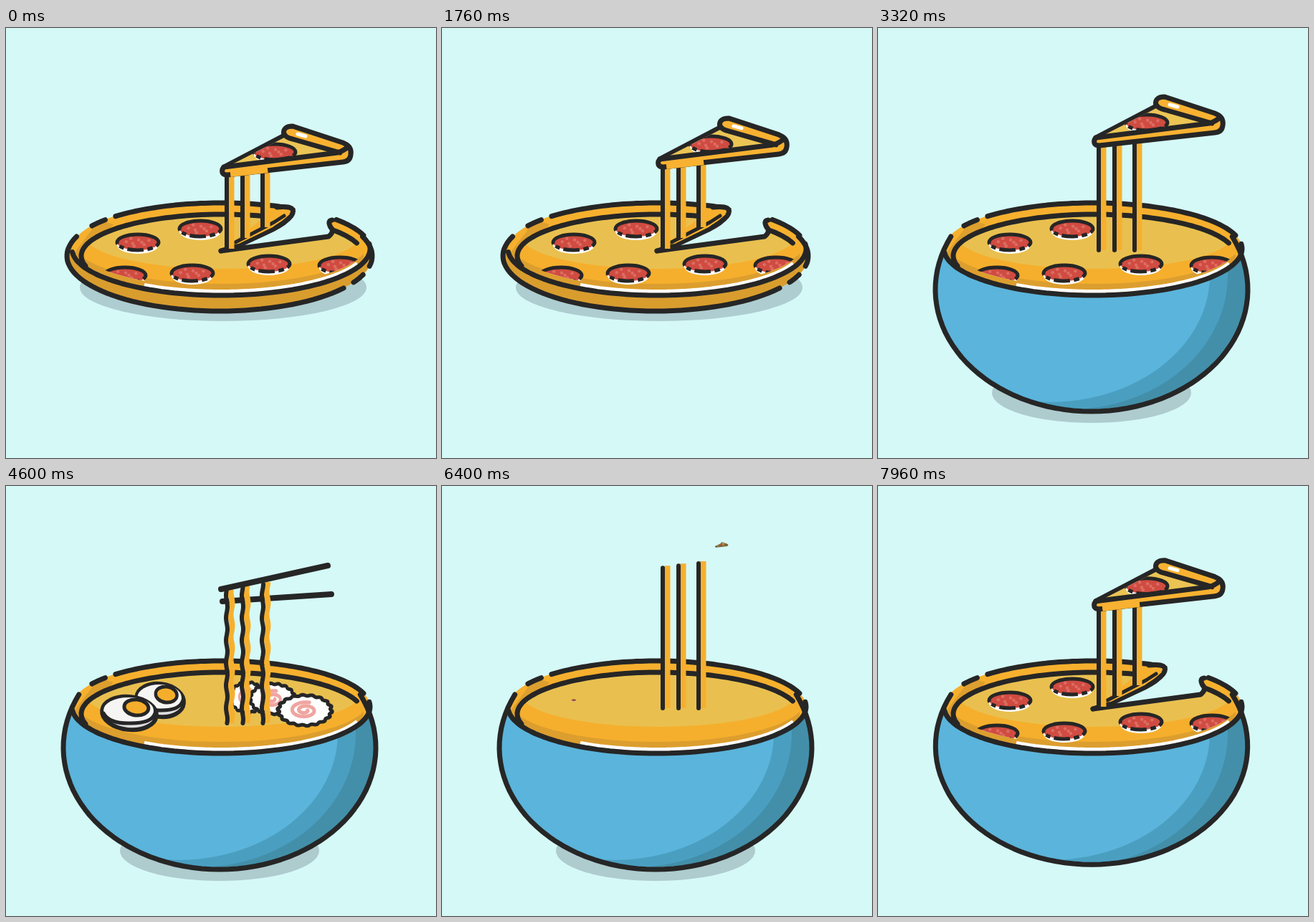
An HTML page for the animation above (8 s loop, 600 px wide and 600 px high).

```html
<!DOCTYPE html>
<html lang="en">
<head>
<meta charset="utf-8">
<title>Pizza and ramen</title>
<style>
  html, body { margin: 0; width: 100%; height: 100%; overflow: hidden; background: #d5f9f7; }
  svg { display: block; width: 100%; height: 100%; }
  .ink { fill: none; stroke: #262626; stroke-width: 7; stroke-linecap: round; stroke-linejoin: round; }
  .thin { stroke-width: 5; }
</style>
</head>
<body>
<svg viewBox="0 0 600 600">
  <defs>
    <clipPath id="rimClip"><ellipse cx="300" cy="308" rx="208" ry="65"/></clipPath>
    <clipPath id="innerClip"><ellipse cx="302" cy="318" rx="197" ry="58"/></clipPath>
    <clipPath id="toppingClip"><ellipse cx="300" cy="300" rx="205" ry="62"/></clipPath>
    <clipPath id="bodyClip"><path id="bodyClipPath"/></clipPath>
    <clipPath id="cutClip"><circle id="cutCircle" cx="300" cy="311"/></clipPath>
    <clipPath id="cheeseClip"><path d="M310 193L392 151L466 174Z"/></clipPath>
    <g id="pepperoni">
      <ellipse cy="4" rx="29" ry="12" fill="#fff"/>
      <ellipse rx="29" ry="11" fill="#d04b41"/>
      <g id="spots" fill="#dc6d62"></g>
      <ellipse class="ink thin" rx="29" ry="11" pathLength="100" style="stroke-linecap:butt"
        stroke-dasharray="5 4 6 4 17 4 5 3 52"/>
    </g>
    <g id="egg">
      <ellipse class="ink" rx="38" ry="23" transform="rotate(6)" style="fill:#dedede;stroke-width:6"/>
      <ellipse cx="-1" cy="-4" rx="35" ry="18" fill="#f5f5f3"/>
      <path class="ink thin" d="M-36 0Q-28 15 2 14Q32 14 36 0"/>
      <ellipse class="ink thin" cx="9" cy="-9" rx="17" ry="11" transform="rotate(6)" style="fill:#f5ae2c"/>
    </g>
    <g id="narutomaki">
      <path id="scallop" class="ink thin" style="fill:#fff"/>
      <path id="spiral" fill="none" stroke="#f0a5a0" stroke-width="5" stroke-linecap="round"/>
    </g>
  </defs>

  <ellipse id="pizzaShadow" cx="303" cy="362" rx="200" ry="47" fill="#aecdd0"/>
  <ellipse id="bowlShadow" cx="298" cy="509" rx="139" ry="42" fill="#aecbce"/>

  <path id="body" fill="#d99d2e"/>
  <g id="glaze" clip-path="url(#bodyClip)">
    <rect x="60" y="280" width="480" height="270" fill="#438fa9"/>
    <ellipse cx="268" cy="345" rx="220" ry="187" fill="#4a9fc1"/>
    <ellipse cx="240" cy="345" rx="223" ry="177" fill="#5bb4db"/>
  </g>

  <g clip-path="url(#rimClip)">
    <rect x="80" y="230" width="440" height="150" fill="#f6b02e"/>
    <path d="M92 318L130 268L150 274L104 328Z" fill="#dd9f2e"/>
    <g clip-path="url(#innerClip)">
      <rect x="80" y="230" width="440" height="150" fill="#dc9e2e"/>
      <ellipse cx="300" cy="300" rx="206" ry="57" fill="#f5af2d"/>
      <ellipse cx="302" cy="290" rx="192" ry="46" fill="#e9c04f"/>
    </g>
  </g>
  <path id="innerRim" class="ink"/>
  <path id="outerRim" class="ink"/>
  <path id="rimDash" class="ink"/>
  <path id="gleam" fill="none" stroke="#fff" stroke-width="5"/>

  <g id="pepperonis" clip-path="url(#toppingClip)"></g>
  <g id="ramenToppings"></g>

  <g clip-path="url(#cutClip)">
    <path fill="#d5f9f7" d="M300 311L397 262L404 252L394 247L398 234L466 244L463 262L454 268L448 273L455 281L450 291Z"/>
    <path class="ink" style="fill:#f6b02e" d="M378 250Q408 247 398 262Q390 272 372 281L325 303L300 311"/>
    <path fill="#f6b02e" d="M312 303L372 270L390 256L396 260L372 278L325 301Z"/>
    <path class="ink thin" d="M320 299L374 271L388 262"/>
    <path class="ink" d="M300 311L450 291Q459 284 453 278Q448 269 455 268"/>
  </g>

  <path id="frontRim" class="ink"/>
  <path id="bodyLine" class="ink"/>

  <path class="ink stick" style="stroke-width:8" d="M302 161L454 151"/>
  <path id="cheese" fill="none" stroke="#f6b02e" stroke-width="8"/>
  <path id="cheeseInk" class="ink" style="stroke-width:6"/>
  <path class="ink stick" style="stroke-width:8" d="M300 144L449 111"/>

  <g id="slice">
    <path class="ink" style="fill:#f8b131" d="M304 194L388 150Q385 137 400 137L470 160Q483 165 481 177Q480 186 470 187L309 205Q300 205 302 197Z"/>
    <path d="M310 193L392 151L466 174Z" fill="#ebc454"/>
    <g clip-path="url(#cheeseClip)"><use href="#pepperoni" x="375" y="173"/></g>
    <path class="ink" d="M304 194L462 174Q470 172 477 166M389 149Q391 153 400 155L466 174"/>
    <path d="M407 148L418 151" stroke="#fff" stroke-width="5" stroke-linecap="round"/>
    <path id="melt" d="M313 203L365 197" stroke="#f8b131" stroke-width="10"/>
  </g>
</svg>
<script>
const $ = id => document.getElementById(id);
const LOOP = 8000, TAU = 2 * Math.PI;
const mix = (a, b, k) => a + (b - a) * k;
const clamp = v => Math.max(0, Math.min(1, v));
const set = (id, attributes) => {
  for (const name in attributes) $(id).setAttribute(name, attributes[name]);
};

// Timing rules: a cubic ease, a state that goes on and off again, and a single hop.
function ease(t, start, end) {
  const x = clamp((t - start) / (end - start));
  return x < .5 ? 4 * x ** 3 : 1 - 4 * (1 - x) ** 3;
}
const between = (t, on, off, duration) => ease(t, on, on + duration) - ease(t, off, off + duration);
const hop = (t, start, end) => Math.sin(Math.PI * clamp((t - start) / (end - start))) ** 2;

function curve(point, count) {
  return 'M' + Array.from({ length: count + 1 }, (_, i) => point(i / count).map(v => v.toFixed(1))).join('L');
}
// Elliptic arc; angles in degrees, clockwise from the right.
const arc = (cx, cy, rx, ry, from, to) => curve(u => {
  const a = mix(from, to, u) * TAU / 360;
  return [cx + rx * Math.cos(a), cy + ry * Math.sin(a)];
}, 70);
const polar = (radius, turns) => curve(u => {
  const a = u * turns * TAU;
  return [37 * radius(u) * Math.cos(a), 21 * radius(u) * Math.sin(a)];
}, 144);

set('outerRim', { d: arc(300, 308, 208, 64, 225, 343) });
set('rimDash', { d: arc(300, 308, 208, 64, 210, 219) });
set('innerRim', { d: arc(302, 318, 197, 58, 166, 342) });
set('frontRim', { d: arc(300, 308, 208, 65, -6, 176) });
set('gleam', { d: arc(300, 308, 202, 59.5, 20, 122) });
set('scallop', { d: polar(u => 1 + .04 * Math.sin(u * 18 * TAU), 1) + 'Z' });
set('spiral', { d: polar(u => .1 + .45 * u, 1.8) });

function add(parent, name, attributes) {
  const node = document.createElementNS('http://www.w3.org/2000/svg', name);
  for (const key in attributes) node.setAttribute(key, attributes[key]);
  return $(parent).appendChild(node);
}
for (let i = 0; i < 8; i++) {
  const a = i * 2.4, r = Math.sqrt((i + .5) / 8);
  add('spots', 'circle', { cx: 22 * r * Math.cos(a), cy: 6 * r * Math.sin(a), r: 2.2 });
}

function place(parent, symbol, x, y, size = 1) {
  const use = add(parent, 'use', { href: '#' + symbol });
  return k => use.setAttribute('transform', `translate(${x} ${y}) scale(${size * k} ${k})`);
}
const pepperonis = [[184, 299], [271, 280], [166, 345], [260, 342], [367, 329], [466, 331]]
  .map(([x, y]) => place('pepperonis', 'pepperoni', x, y));
const ramen = [
  place('ramenToppings', 'egg', 215, 299, .88),
  place('ramenToppings', 'egg', 172, 317),
  place('ramenToppings', 'narutomaki', 337, 295, .65),
  place('ramenToppings', 'narutomaki', 372, 297, .84),
  place('ramenToppings', 'narutomaki', 417, 313),
];

// The side is an elliptic bow hanging from the rim; it deepens from crust to bowl.
function bodyPath(bowl) {
  const cy = mix(318, 365, bowl), ry = mix(77, 170, bowl);
  const rimAngle = Math.asin((291 - cy) / ry) * 360 / TAU;
  return arc(298, cy, mix(213, 218, bowl), ry, rimAngle, 180 - rimAngle);
}

const strand = (x, top, bottom, wave, phase) => curve(u => {
  const y = mix(top, bottom, u);
  return [x + wave * Math.sin(y / 5 + phase), y];
}, 60);

function draw(t) {
  const bowl = ease(t, 1780, 2350) - ease(t, 7860, 8300);
  const open = 1 - between(t, 2560, 7150, 430);
  const noodles = between(t, 3550, 6000, 450);
  const sliceSize = 1 - between(t, 3500, 6300, 350);
  const sticks = between(t, 3720, 5980, 350);
  const lift = -41 * (ease(t, 1590, 2090) - ease(t, 7860, 8140))
    - 55 * hop(t, 300, 1910) - 47 * between(t, 3400, 6400, 400) - 28 * hop(t, 7150, 7650);

  const outline = bodyPath(bowl), gap = 1 - clamp(bowl * 2);
  set('body', { d: outline });
  set('bodyClipPath', { d: outline });
  set('bodyLine', { d: outline, 'stroke-dasharray': gap ? `46 ${15 * gap} 17 ${16 * gap} 2000` : 'none' });
  set('glaze', { opacity: clamp(bowl * 2) });
  set('pizzaShadow', { opacity: 1 - clamp(bowl * 4) });
  set('bowlShadow', { opacity: between(t, 2350, 7560, 250) });
  set('cutCircle', { r: open * 185 });

  pepperonis.forEach((scale, i) => scale(1 - between(t, 3420 + i * 35, 6330 + i * 35, 240)));
  ramen.forEach((scale, i) => scale(between(t, 3680 + i * 40, 5950 + i * 40, 300)));

  const phase = -t / 1120 * TAU;
  let ink = '', cheese = '';
  for (let i = 0; i < 3; i++) {
    const x = 308 + 25 * i - (i === 1 ? 3 : 0);
    const top = mix(202 - 3 * i + lift, 147 - 5 * i, noodles);
    const bottom = mix(mix(310, 308 - 15 * i, open), 331, noodles);
    ink += strand(x, top, bottom, noodles, phase);
    cheese += strand(x + 6.5, top - 3, bottom, noodles, phase + 1);
  }
  set('cheeseInk', { d: ink });
  set('cheese', { d: cheese });

  for (const stick of document.querySelectorAll('.stick')) {
    stick.setAttribute('transform', `translate(${375 * (1 - sticks)} ${60 * (1 - sticks)}) scale(${sticks})`);
    stick.setAttribute('visibility', sticks > .01 ? 'visible' : 'hidden');
  }
  set('slice', {
    transform: `translate(390 ${170 + lift}) scale(${sliceSize}) translate(-390 -170)`,
    visibility: sliceSize > .01 ? 'visible' : 'hidden',
  });
  set('melt', { opacity: open });
}

function frame(now) {
  draw(now % LOOP);
  requestAnimationFrame(frame);
}
draw(0);
requestAnimationFrame(frame);
</script>
</body>
</html>
```
